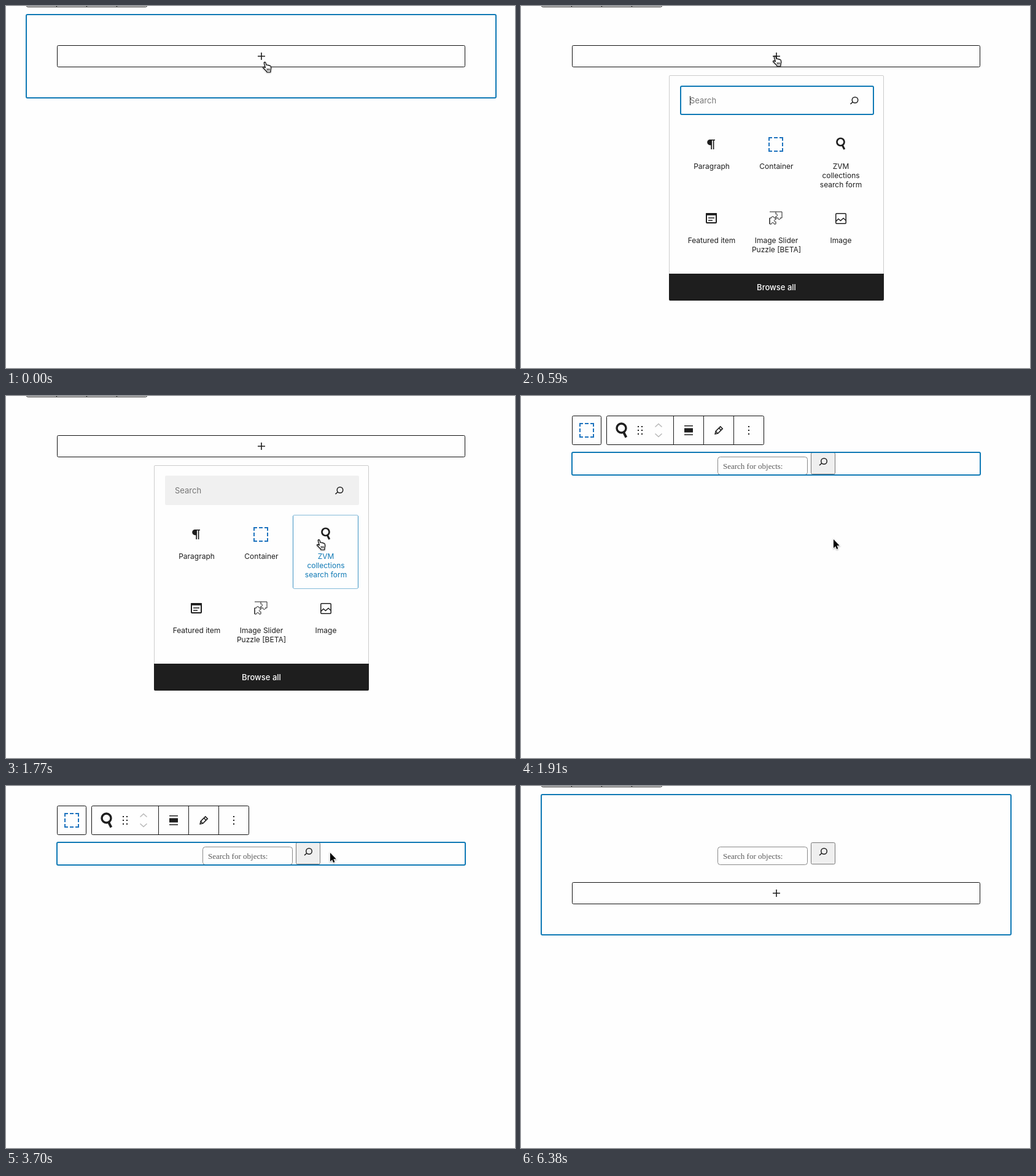
Animation, 829 px wide and 591 px high, one loop 6680 ms. Source, as an HTML page:

```html
<!DOCTYPE html>
<html lang="en">
<head>
<meta charset="utf-8">
<title>Block inserter</title>
<style>
  html, body { margin: 0; width: 100%; height: 100%; overflow: hidden; background: #fefefe; }
  svg { display: block; width: 829px; height: 591px; }
  text { font: 12px Inter, Roboto, sans-serif; fill: #1e1e1e; }
  .mid { text-anchor: middle; }
  .ui { font-size: 13px; }
  .serif { font: 13px "Liberation Serif", serif; fill: #5a5a5a; }
  .line { fill: none; stroke: #1e1e1e; }
  .box { fill: #fefefe; stroke: #111; }
  .blue { fill: none; stroke: #0f79b5; stroke-width: 2; }
  .ink { fill: #1e1e1e; }
  .hover text { fill: #0f79b5; }
  .cursor { filter: drop-shadow(0 1px 1px rgba(0, 0, 0, .35)); }
</style>
</head>
<body>
<svg viewBox="0 0 829 591">
  <defs>
    <path id="container" d="M1 1H23V23H1Z" fill="none" stroke="#1e73be" stroke-width="2"
      stroke-dasharray="10 3 6 3" stroke-dashoffset="5"/>
    <g id="lens" class="line" stroke-width="1.5">
      <circle cx="13.5" cy="11.5" r="4.75"/><path d="M9.9 14.7L6 18.1"/>
    </g>
    <g id="glass" class="line">
      <circle r="6" stroke-width="2.7"/><path d="M2.9 5.4L6.3 12" stroke-width="3.1"/>
    </g>
    <g id="appender">
      <rect class="box" x="83.5" y="64.5" width="664" height="35" rx="2"/>
      <path class="line" d="M410 82H422M416 76V88" stroke-width="1.6"/>
    </g>
    <g id="form">
      <rect x="320.5" y="99.5" width="146" height="29" rx="4" fill="#fefefe" stroke="#898989"/>
      <text class="serif" x="329" y="119">Search for objects:</text>
      <rect x="472.5" y="92.5" width="39" height="35" rx="2" fill="#efefef" stroke="#777"/>
      <use href="#lens" x="480" y="95"/>
    </g>
  </defs>

  <g id="stub">
    <rect class="box" x="33.5" y="-46.5" width="196" height="48" rx="2"/>
    <path class="line" d="M82.5 0V1M131.5 0V1M180.5 0V1"/>
  </g>

  <g id="empty">
    <rect class="blue" x="33" y="14" width="765" height="136" rx="2"/>
    <use href="#appender"/>
  </g>

  <g id="inserter">
    <use href="#appender"/>
    <rect x="241.5" y="113.5" width="349" height="367" rx="1.5" fill="#fefefe" stroke="#ccc"/>
    <g id="focused">
      <rect class="blue" x="260" y="131" width="314" height="46" rx="2"/>
      <path class="line" d="M275.5 147V162"/>
    </g>
    <rect id="blurred" x="259" y="130" width="316" height="48" rx="2" fill="#f0f0f0"/>
    <text class="ui" x="275" y="159" style="fill:#757575">Search</text>
    <use href="#lens" x="530.5" y="142"/>

    <path class="ink" d="M316 218H307.8a4.6 4.6 0 0 0 0 9.2H309.3V234H311V219.6H312.7V234H314.4V219.6H316Z"/>
    <use href="#container" x="403" y="214"/>
    <g id="pressed" fill="none" stroke="#0f79b5">
      <rect x="467.5" y="194.5" width="106" height="120" rx="2" opacity=".5"/>
      <path d="M467.5 196V313M573.5 196V313" opacity=".6"/>
    </g>
    <use href="#glass" x="520.5" y="222"/>

    <g class="line">
      <rect x="302" y="339" width="16" height="15" rx="1" stroke-width="2"/>
      <path d="M301 340H319" stroke-width="3.6"/>
      <path d="M305 346H315M305 350H312" stroke-width="1.7"/>
      <path d="M405 336H425V346H422C423.5 349.5 417.500 349.500 419 346H415V349C411.500 347.500 411.500 353.500 415 352V356H412C413 353 407 353 408 356H405V346H408C407 343 413 343 412 346H415V343C418.500 344.500 418.500 338.500 415 340V336M405 346V356"/>
      <rect x="512.75" y="338.75" width="16.500" height="16.500" rx="1.5" stroke-width="1.5"/>
      <path d="M513 351.500L517 347.500 520.500 350.500 525 346.500 529 350" stroke-width="1.5"/>
    </g>

    <g class="mid">
      <text x="310.5" y="266">Paragraph</text>
      <text x="416" y="266">Container</text>
      <g id="choice">
        <text x="521" y="266">ZVM</text>
        <text x="521" y="281">collections</text>
        <text x="521" y="296">search form</text>
      </g>
      <text x="310.5" y="387">Featured item</text>
      <text x="416" y="387">Image Slider</text>
      <text x="416" y="402">Puzzle [BETA]</text>
      <text x="521" y="387">Image</text>
    </g>
    <path class="ink" d="M241 437H591V479a2 2 0 0 1-2 2H243a2 2 0 0 1-2-2Z"/>
    <text class="ui mid" x="416" y="464" style="fill:#fff;font-weight:500">Browse all</text>
  </g>

  <g id="selected">
    <rect class="box" x="83.5" y="32.5" width="47" height="47" rx="2"/>
    <use href="#container" x="95" y="44"/>
    <rect class="box" x="139.5" y="32.5" width="256" height="47" rx="2"/>
    <path class="line" d="M248.500 33V79M297.500 33V79M346.500 33V79"/>
    <use href="#glass" transform="translate(163.500 52.500) scale(1.250)"/>
    <path class="line" d="M191 49V64M197 49V64M371 49V64" stroke-width="2" stroke-dasharray="2 4"/>
    <path d="M218.500 50.500L224 45.500 229.500 50.500M218.500 61.500L224 66.500 229.500 61.500"
      fill="none" stroke="#b8b8b8" stroke-width="1.5"/>
    <path class="line" d="M266 48.800H280M266 63.200H280" stroke-width="1.5"/>
    <rect class="ink" x="266" y="52.500" width="14" height="7"/>
    <path class="line" d="M316.200 62L317.200 57.500 324.800 50 328.200 53.400 320.700 61Z" stroke-width="1.6"/>
    <path class="line" d="M322.500 52.500L326 56M317.500 58L320 60.500" stroke-width="1.6"/>
    <use href="#form"/>
    <rect class="blue" x="83" y="92" width="665" height="37" rx="2"/>
  </g>

  <g id="filled">
    <rect class="blue" x="33" y="14" width="765" height="229" rx="2"/>
    <use href="#form"/>
    <use href="#appender" y="93"/>
  </g>

  <g id="hand" class="cursor">
    <path d="M3.300 1.600C3.600 .400 5.300 .300 5.800 1.600L7.200 5.600C7.600 4.700 9.200 4.800 9.600 6C10.200 5.200 11.600 5.500 11.900 6.700C12.700 6 14 6.600 14.300 7.800C14.900 10 15 11.500 14 13.500L13.800 17H8L7.600 15.800C6 14.500 4.500 12.200 2.200 10.600C1 9.600 1.600 8 3.200 8.600L5.400 9.800Z"
      fill="#fff" stroke="#000" stroke-width="1.200" stroke-linejoin="round"/>
    <path d="M8 11L8.600 14.500M10 11L10.300 14.500M12 11V14.500" fill="none" stroke="#000" stroke-width=".9"/>
  </g>
  <g id="arrow" class="cursor">
    <path d="M0 0V14.200L3.200 11.200 5.200 16 7.400 15 5.400 10.300H9.800Z"
      fill="#000" stroke="#fff" stroke-width="1.600" paint-order="stroke"/>
  </g>
</svg>

<script>
  const LOOP = 6680;

  // start time, visible layer
  const scenes = [[0, "empty"], [590, "inserter"], [1910, "selected"], [4730, "filled"]];

  // start time, pointer shape, x, y
  const moves = [
    [0, "hand", 417, 91], [150, "hand", 415, 89], [295, "hand", 411, 84], [440, "hand", 409, 81],
    [890, "hand", 412, 85], [1036, "hand", 430, 111], [1181, "hand", 457, 155],
    [1327, "hand", 483, 200], [1473, "hand", 499, 226], [1620, "hand", 505, 234],
    [1910, "arrow", 509, 234],
    [2810, "arrow", 488, 194], [2958, "arrow", 412, 112], [3107, "arrow", 341, 50],
    [3255, "arrow", 372, 66], [3403, "arrow", 449, 94], [3552, "arrow", 510, 107],
    [3700, "arrow", 528, 109],
    [4150, "arrow", 527, 134], [4295, "arrow", 522, 204], [4440, "arrow", 517, 268],
    [4585, "arrow", 514, 298],
    [5930, "arrow", 548, 334], [6080, "arrow", 646, 438], [6230, "arrow", 750, 568],
    [6380, "none", 0, 0]
  ];

  const $ = id => document.getElementById(id);
  const show = (id, on) => { $(id).style.display = on ? "" : "none"; };
  const at = (table, t) => table.findLast(row => row[0] <= t);

  function draw(t) {
    const scene = at(scenes, t)[1];
    for (const [, id] of scenes) show(id, id === scene);
    show("stub", scene !== "selected");

    const pressed = t >= 1770;
    show("focused", !pressed);
    show("blurred", pressed);
    show("pressed", pressed);
    $("choice").classList.toggle("hover", t >= 1473);

    const [, shape, x, y] = at(moves, t);
    for (const id of ["hand", "arrow"]) {
      show(id, id === shape);
      $(id).setAttribute("transform", `translate(${x} ${y})`);
    }
  }

  const start = performance.now();
  function tick() {
    draw((performance.now() - start) % LOOP);
    requestAnimationFrame(tick);
  }
  tick();
</script>
</body>
</html>
```
